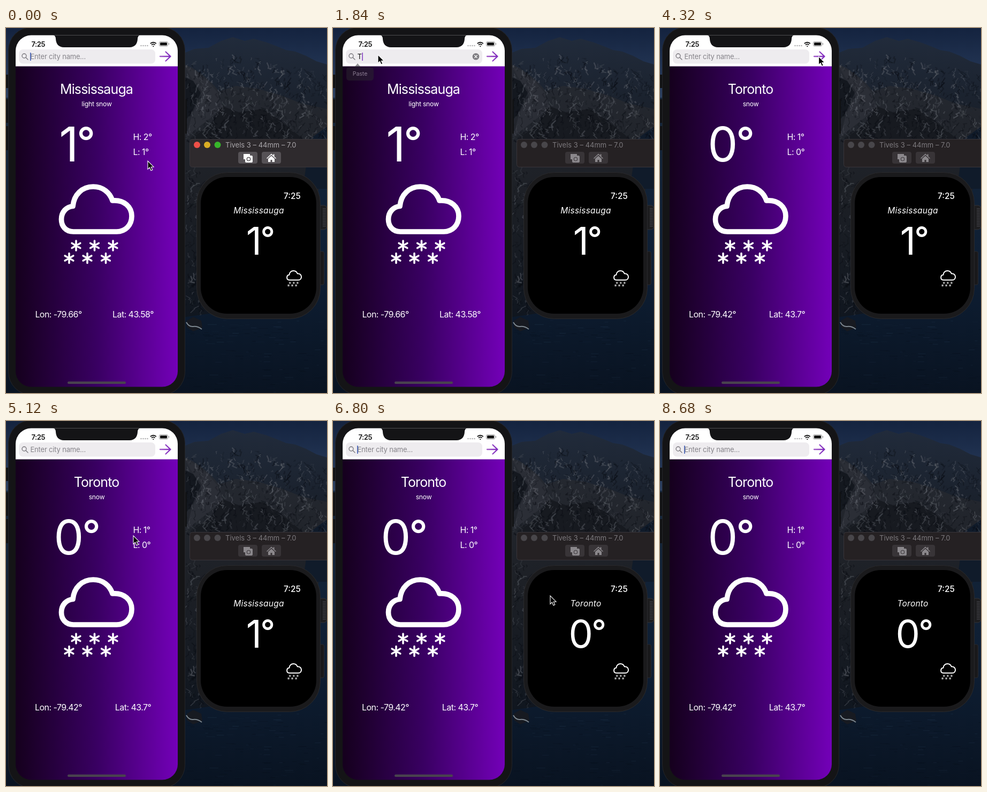
An HTML page that plays this animation: 600 by 681 pixels, repeating every 8720 ms.

```html
<!DOCTYPE html>
<html lang="en">
<head>
<meta charset="utf-8">
<title>Weather on phone and watch</title>
<style>
  html, body { margin: 0; width: 100%; height: 100%; overflow: hidden; background: #0c1626; }
  svg { display: block; width: 600px; height: 681px; }
  text { font-family: Inter, Roboto, sans-serif; fill: #fff; letter-spacing: -.035em; white-space: pre; }
  .mid { text-anchor: middle; }
  .line { fill: none; stroke: #fff; stroke-linecap: round; stroke-linejoin: round; }
  .lights circle { fill: #48464a; }
  .active .lights circle:nth-child(1) { fill: #ee4f47; }
  .active .lights circle:nth-child(2) { fill: #d9ad24; }
  .active .lights circle:nth-child(3) { fill: #37b52a; }
  #bar > rect { fill: #252123; }
  #bar.active > rect { fill: #2e2a2d; }
  #bar text { fill: #7c797d; letter-spacing: 0; }
  #bar.active text { fill: #aaa7ab; }
  .tool rect { fill: #383437; }
  .tool { color: #8b888c; }
  .active .tool rect { fill: #565256; }
  .active .tool { color: #fff; }
</style>
</head>
<body>
<svg viewBox="0 0 600 681">
  <defs>
    <linearGradient id="sky" x2="0" y2="1"><stop stop-color="#14233f"/><stop offset="1" stop-color="#2c4060"/></linearGradient>
    <linearGradient id="sea" x2="0" y2="1"><stop stop-color="#15263a"/><stop offset=".6" stop-color="#0e1e33"/><stop offset="1" stop-color="#091321"/></linearGradient>
    <linearGradient id="peak" x2="0" y2="1"><stop stop-color="#212b3b"/><stop offset="1" stop-color="#151a22"/></linearGradient>
    <linearGradient id="rock" x2="0" y2="1"><stop stop-color="#262a32"/><stop offset=".5" stop-color="#1d2026"/><stop offset="1" stop-color="#10161f"/></linearGradient>
    <linearGradient id="violet"><stop stop-color="#15001d"/><stop offset=".5" stop-color="#390062"/><stop offset="1" stop-color="#7300b8"/></linearGradient>
    <linearGradient id="arrow" gradientUnits="userSpaceOnUse" x1="287" x2="309"><stop stop-color="#a45fc8"/><stop offset="1" stop-color="#7d27bd"/></linearGradient>
    <clipPath id="screen"><rect x="18" y="13.5" width="303" height="656" rx="29"/></clipPath>
    <g id="snow" class="line">
      <path stroke-width="9.700" d="M126 380C111 380 103.500 369 103.500 357C103.500 343 113 333.500 125 332.500C127 311 142 296 163 296C181 296 194 307 199 322C221 320 235 334 235 351C235 368 223 380 207 380Z"/>
      <path id="flakes" stroke-width="3.600"/>
    </g>
  </defs>

  <g id="scenery">
    <rect width="600" height="130" fill="url(#sky)"/>
    <rect y="130" width="600" height="551" fill="url(#sea)"/>
    <path fill="url(#peak)" d="M330 48L352 39L378 37L402 24L424 17L446 24L463 20L488 27L506 34L523 41L541 44L561 52L580 62L600 68V240H330Z"/>
    <path fill="url(#rock)" d="M330 66L349 75L368 88L385 103L398 118L430 108L470 113L515 126L553 141L600 151V244L585 300L540 400L400 530L330 540Z"/>
    <path fill="#2b2e36" d="M334 71L357 82L379 101L396 121L405 148L382 168L350 193L336 205L348 160L366 126Z"/>
    <path fill="#14181f" d="M330 90L350 99L364 121L350 152L330 181Z"/>
    <path fill="#171a20" d="M405 146L435 157L480 151L515 174L555 207H345L381 181Z"/>
    <path fill="#101b2a" d="M568 207L600 184V300H555Z"/>
    <path fill="#171a21" d="M338 546L350 539L365 546L367 559L350 566L338 558Z"/>
    <path fill="none" stroke="#7d878f" stroke-width="2" d="M337 549Q342 558 350 557T366 562"/>
    <g id="grain" fill="none"/>
  </g>

  <!-- phone -->
  <g fill="#111214">
    <path d="M0 87h6v25H0zM0 133h6v44H0zM0 183h6v45H0zM333 133h5v64h-5z"/>
    <rect x="4.500" y="-1.500" width="330" height="686" rx="43" fill="#141416" stroke="#242529"/>
  </g>
  <g clip-path="url(#screen)">
    <rect x="18" y="71" width="303" height="600" fill="url(#violet)"/>
    <rect x="18" y="13" width="303" height="58.500" fill="#fff"/>
    <path fill="#141416" d="M86 12.500q7 1 7 8q1 15 15 15.500H231q14-.5 15-15.500q0-7 7-8z"/>
  </g>
  <text x="47.500" y="34.500" font-size="13" font-weight="600" style="fill:#111">7:25</text>
  <g fill="#b3b3b5"><circle cx="252.500" cy="33" r="1.300"/><circle cx="256.500" cy="33" r="1.300"/><circle cx="260.500" cy="33" r="1.300"/><circle cx="264.500" cy="33" r="1.300"/></g>
  <g fill="none" stroke="#111" stroke-width="1.800"><path d="M269.800 29q5.500-4.600 11 0M272 31.500q3.300-2.700 6.600 0"/><path d="M274.600 33.500l.7.600l.7-.6"/></g>
  <rect x="286.500" y="25.500" width="16" height="8.500" rx="2.500" fill="none" stroke="#999"/>
  <rect x="288" y="27" width="13" height="5.500" rx="1.200" fill="#111"/>
  <path d="M304.500 28v3.500" stroke="#999" stroke-width="1.200"/>

  <rect x="24" y="40" width="255" height="26.500" rx="7.500" fill="#eeecef"/>
  <g class="line" style="stroke:#77757b" stroke-width="1.300"><circle cx="34" cy="52" r="4"/><path d="M37 55l4 4"/></g>
  <text id="field" x="45.500" y="58" font-size="13" style="letter-spacing:-.015em"></text>
  <rect id="caret" y="46" width="1.700" height="15"/>
  <g id="clear"><circle cx="267" cy="53.300" r="6.300" fill="#7f7d82"/><path class="line" stroke-width="1.300" d="M264.700 51l4.600 4.600m0-4.600l-4.600 4.600"/></g>
  <path class="line" style="stroke:url(#arrow)" stroke-width="2.300" d="M288 53H307M298.500 44.500L307.500 53L298.500 61.500"/>
  <g id="paste">
    <path fill="#2b292f" d="M40 73L46 66L52 73H70q6 0 6 6V92q0 6-6 6H31q-6 0-6-6V79q0-6 6-6z"/>
    <text class="mid" x="50.500" y="89" font-size="10.500" style="letter-spacing:0">Paste</text>
  </g>

  <text id="city" class="mid" x="169" y="123" font-size="25"></text>
  <text id="sky-text" class="mid" x="169.500" y="146" font-size="12.200" style="letter-spacing:-.02em"></text>
  <text class="mid" x="131.500" y="249" font-size="89"><tspan id="temp"></tspan><tspan font-size="76" font-weight="500" dy="-9.500">°</tspan></text>
  <text id="high" x="237.500" y="208.500" font-size="16"></text>
  <text id="low" x="237.500" y="236.500" font-size="16"></text>
  <use href="#snow"/>
  <text id="lon" class="mid" x="98" y="539.500" font-size="16"></text>
  <text id="lat" class="mid" x="237.500" y="539.500" font-size="16"></text>
  <rect x="115" y="659.500" width="109" height="4.500" rx="2.250" fill="#49434e"/>

  <!-- watch window -->
  <g id="bar">
    <rect x="343.500" y="207.500" width="262" height="52" rx="5" stroke="#38353a"/>
    <g class="lights"><circle cx="357" cy="218" r="6"/><circle cx="376" cy="218" r="6"/><circle cx="395.500" cy="218" r="6"/></g>
    <text x="410" y="223" font-size="13">Tivels 3 – 44mm – 7.0</text>
    <g class="tool"><rect x="434" y="231" width="36" height="22" rx="4"/>
      <path fill="currentColor" d="M444 235h12v3h3q2 0 2 2v9q0 2-2 2h-10q-2 0-2-2v-4h-3z"/><circle cx="453.500" cy="244.500" r="3.200" fill="none" stroke="#4a464a" stroke-width="1.300"/></g>
    <g class="tool"><rect x="478" y="231" width="36" height="22" rx="4"/>
      <path fill="currentColor" d="M487 243l9-8.500l3.500 3.300v-2.300h2v4.200l3.500 3.300l-1 1l-8-7.500l-8 7.500zM490 244l6-5.500l6 5.500v6h-4.500v-4h-3v4H490z"/></g>
  </g>
  <rect x="583" y="331" width="17" height="45" rx="6" fill="#1d1d1f" stroke="#333337"/>
  <path id="crown" stroke="#4b4b50" stroke-width="1"/>
  <rect x="583" y="417" width="11.500" height="62" rx="3" fill="#19191b" stroke="#2a2a2e"/>
  <rect x="356.500" y="269.500" width="231" height="273" rx="57" fill="#1a1a1c" stroke="#29292c"/>
  <rect x="364" y="278" width="216" height="255" rx="49"/>
  <text x="519" y="319" font-size="15.500" font-weight="500" style="letter-spacing:0">7:25</text>
  <text id="wrist-city" class="mid" x="472.500" y="345.500" font-size="15.500" font-style="italic" style="letter-spacing:.015em"></text>
  <text class="mid" x="474.500" y="423" font-size="72"><tspan id="wrist-temp"></tspan><tspan font-size="60" font-weight="500" dy="-9">°</tspan></text>
  <use href="#snow" transform="translate(503.900 392.300) scale(.205)"/>

  <path id="cursor" d="M0 0V15.500L3.500 12.200L6 18L8.800 16.800L6.300 11.200H11Z" stroke="#fff" stroke-width="1.100"/>
</svg>
<script>
const LOOP = 8720;
const $ = id => document.getElementById(id);

const places = [
  { city: 'Mississauga', 'sky-text': 'light snow', temp: '1', high: 'H: 2°', low: 'L: 1°', lon: 'Lon: -79.66°', lat: 'Lat: 43.58°' },
  { city: 'Toronto', 'sky-text': 'snow', temp: '0', high: 'H: 1°', low: 'L: 0°', lon: 'Lon: -79.42°', lat: 'Lat: 43.7°' }
];
// time, x, y
const path = [
  [40, 265, 248], [640, 84, 50], [3190, 84, 50], [3815, 297, 52], [4280, 297, 52],
  [5080, 238, 214], [5320, 238, 214], [6200, 406, 326], [7200, 406, 326], [7900, 615, 420]
];
const typeStart = 1760, keyGap = 165, clearAt = 4120, phoneAt = 4280, watchAt = 5840;

const clamp = v => Math.min(1, Math.max(0, v));
const ramp = (t, from, to) => clamp((t - from) / (to - from));
const setText = (id, s) => { if ($(id).textContent !== s) $(id).textContent = s; };
const show = (id, opacity) => $(id).setAttribute('opacity', +opacity);

function cursorAt(t) {
  const i = path.findIndex(p => p[0] > t);
  if (i === 0) return path[0].slice(1);
  if (i < 0) return path.at(-1).slice(1);
  const [a, b] = [path[i - 1], path[i]];
  const k = ramp(t, a[0], b[0]), e = k * k * (3 - 2 * k);
  return [a[1] + (b[1] - a[1]) * e, a[2] + (b[2] - a[2]) * e];
}

function caretOn(t) {
  const lastKey = typeStart + 6 * keyGap;
  if (t < typeStart) return t % 1000 < 500;
  if (t < clearAt) return t < lastKey || (t - lastKey) % 1000 < 500;
  const phase = t % 1000;
  return phase >= 450 && phase < 950;
}

function draw(t) {
  const place = places[+(t >= phoneAt)];
  for (const id in place) setText(id, place[id]);
  const wrist = places[+(t >= watchAt)];
  setText('wrist-city', wrist.city);
  setText('wrist-temp', wrist.temp);
  $('bar').setAttribute('class', t < 640 ? 'active' : '');

  const count = t < typeStart || t >= clearAt ? 0 : Math.floor((t - typeStart) / keyGap) + 1;
  const typed = 'Toronto'.slice(0, count);
  setText('field', typed || 'Enter city name...');
  $('field').style.fill = typed ? '#111' : '#858389';
  $('caret').setAttribute('x', typed ? 46 + $('field').getComputedTextLength() : 45);
  $('caret').setAttribute('fill', typed ? '#8b4bc4' : '#4562b5');
  show('caret', caretOn(t));
  show('clear', count > 0);
  show('paste', ramp(t, 1200, 1320) * (1 - ramp(t, 1760, 1920)));
  $('cursor').setAttribute('transform', `translate(${cursorAt(t)})`);
}

function buildParts() {
  let d = '';
  for (const [y, xs] of [[406, [131, 165.5, 200]], [429.500, [118, 152, 186.5]]])
    for (const x of xs)
      for (let k = 0; k < 3; k++) {
        const a = Math.PI * (.5 + k / 3), dx = 9 * Math.cos(a), dy = 9 * Math.sin(a);
        d += `M${x - dx} ${y - dy}L${x + dx} ${y + dy}`;
      }
  $('flakes').setAttribute('d', d);

  d = '';
  for (let y = 337; y < 372; y += 3) d += `M592 ${y}h6`;
  $('crown').setAttribute('d', d);

  // broken slopes on the rocks and ripples on the sea
  let seed = 7;
  const rnd = () => (seed = seed * 16807 % 2147483647) / 2147483647;
  const crack = (x, y, size) => {
    const side = rnd() < .5 ? -size : size;
    return `<path d="M${x} ${y}l${side * rnd()} ${size * rnd()}l${-side * rnd() * .5} ${size * rnd() * .6}l${side * rnd()} ${size * rnd()}" stroke="${rnd() < .45 ? '#686c74' : '#080b11'}" stroke-width="${.7 + rnd() * 1.8}" opacity="${.15 + rnd() * .35}"/>`;
  };
  let html = '';
  for (let i = 0; i < 560; i++) {
    const x = 336 + rnd() * 264;
    html += crack(x, 48 + Math.abs(x - 425) * .2 + rnd() * 150, 3 + rnd() * 7);
  }
  for (let i = 0; i < 120; i++) html += crack(336 + rnd() * 40, 258 + rnd() * 270, 3 + rnd() * 6);
  for (let i = 0; i < 150; i++)
    html += `<path d="M${335 + rnd() * 265} ${545 + rnd() * 136}h${4 + rnd() * 14}" stroke="${rnd() < .5 ? '#2a405a' : '#050b14'}" opacity="${rnd() * .35}"/>`;
  $('grain').innerHTML = html;
}

buildParts();
const start = performance.now();
function tick() {
  draw((performance.now() - start) % LOOP);
  requestAnimationFrame(tick);
}
tick();
</script>
</body>
</html>
```
